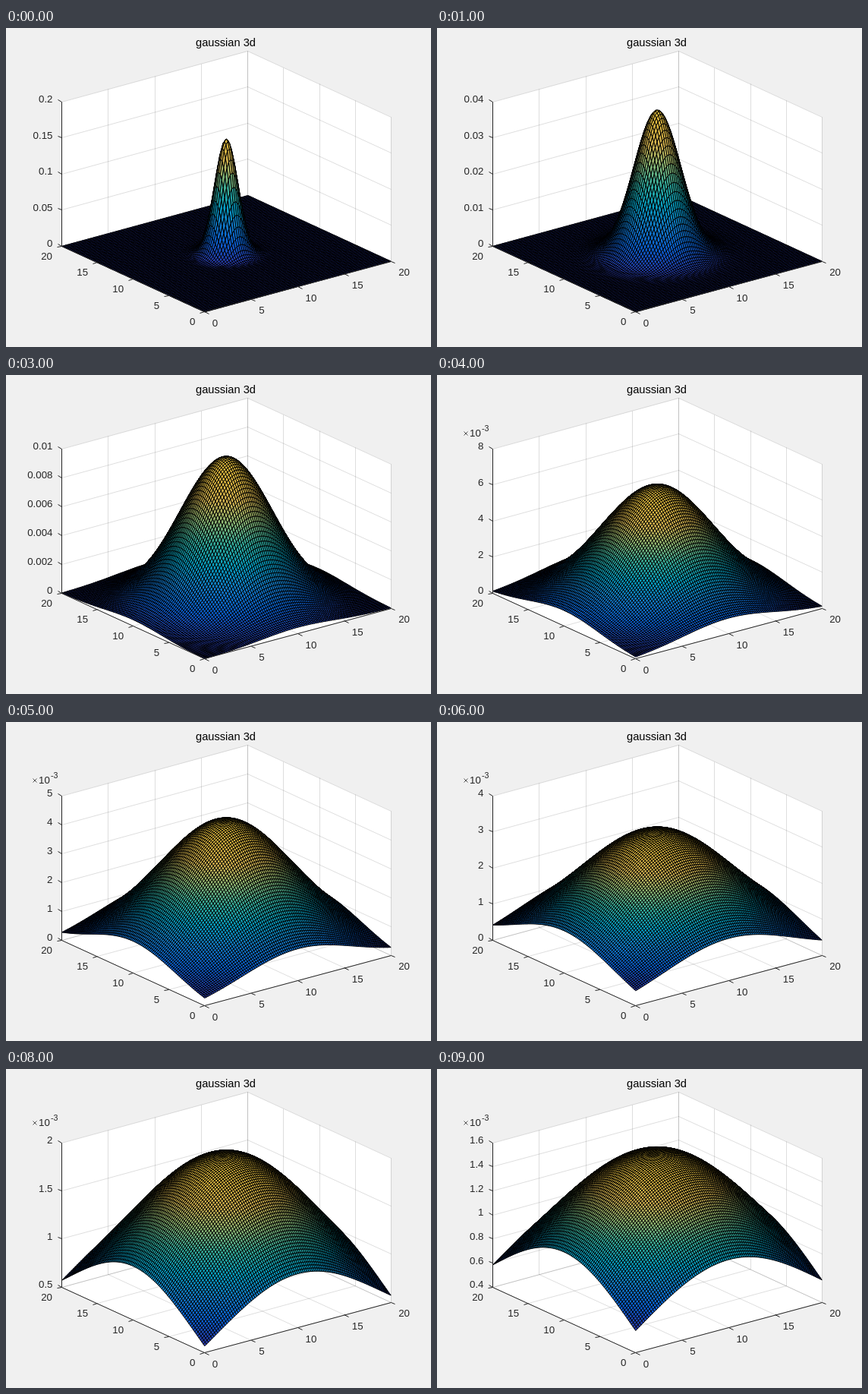
Recreate the animation shown at these times as an HTML page with a canvas. Size 560 by 420 pixels, loop 10000 ms.

```html
<!DOCTYPE html>
<html lang="en">
<head>
<meta charset="utf-8">
<title>gaussian 3d</title>
<style>
  html, body { margin: 0; width: 100%; height: 100%; overflow: hidden; background: #f0f0f0; }
  canvas { display: block; width: 560px; height: 420px; }
</style>
</head>
<body>
<canvas id="stage" width="560" height="420"></canvas>
<script>
const ctx = document.getElementById('stage').getContext('2d');
const INK = '#262626';
const FONT = '"Liberation Sans", Arial, sans-serif';
const SIZE = 20, CELLS = 100, HEIGHT = 190;

// Vertical axis for sigma = 1..10: low, high, step, unit
const AXES = [
  [0, 0.2, 0.05, 1],
  [0, 0.04, 0.01, 1],
  [0, 0.02, 0.005, 1],
  [0, 0.01, 0.002, 1],
  [0, 8, 2, 1e-3],
  [0, 5, 1, 1e-3],
  [0, 4, 1, 1e-3],
  [0.5, 2.5, 0.5, 1e-3],
  [0.5, 2, 0.5, 1e-3],
  [0.4, 1.6, 0.2, 1e-3]
];

// Surface colours from the lowest to the highest point
const RAMP = [
  [42, 56, 170], [10, 98, 215], [18, 128, 208], [6, 162, 196], [52, 178, 160],
  [142, 186, 118], [215, 182, 82], [224, 186, 66], [226, 190, 60]
];

function rampColor(t) {
  const p = Math.max(0, Math.min(1, t)) * (RAMP.length - 1);
  const i = Math.min(RAMP.length - 2, Math.floor(p));
  const mix = RAMP[i].map((c, n) => Math.round(c + (RAMP[i + 1][n] - c) * (p - i)));
  return `rgb(${mix})`;
}

// h is the fraction of the vertical axis
function project(x, y, h = 0) {
  const u = x / SIZE, v = y / SIZE;
  return [261.8 + 245.4 * u - 188.3 * v, 373.9 - 66.8 * u - 86.6 * v - HEIGHT * h];
}

function trace(points) {
  ctx.beginPath();
  points.forEach(([x, y], i) => i ? ctx.lineTo(x, y) : ctx.moveTo(x, y));
}

// One-pixel line with its ends on pixel centres
function line(color, ...points) {
  trace(points.map(p => p.map(c => Math.floor(c) + 0.5)));
  ctx.strokeStyle = color;
  ctx.lineWidth = 1;
  ctx.stroke();
}

function text(str, x, y, align, size = 13.33, color = INK) {
  ctx.font = `${size}px ${FONT}`;
  ctx.textAlign = align;
  ctx.textBaseline = 'alphabetic';
  ctx.fillStyle = color;
  ctx.fillText(str, x, y);
}

function heights([low, high, step]) {
  const count = Math.round((high - low) / step);
  return Array.from({ length: count + 1 }, (_, i) => ({
    h: i / count,
    label: String(+(low + i * step).toFixed(4))
  }));
}

function drawBox(ticks) {
  const grid = 'rgba(38,38,38,0.15)';
  ctx.fillStyle = '#fff';
  trace([project(0, 0), project(0, 20), project(0, 20, 1), project(20, 20, 1),
         project(20, 0, 1), project(20, 0)]);
  ctx.fill();
  for (let v = 0; v <= SIZE; v += 5) {
    line(grid, project(v, 0), project(v, 20), project(v, 20, 1));
    line(grid, project(0, v), project(20, v), project(20, v, 1));
  }
  for (const { h } of ticks) {
    line(grid, project(0, 20, h), project(20, 20, h), project(20, 0, h));
  }
}

function drawSurface(sigma, [low, high, , unit]) {
  const peak = 1 / (2 * Math.PI * sigma * sigma);
  const gauss = (x, y) =>
    peak * Math.exp(-((x - 10) ** 2 + (y - 10) ** 2) / (2 * sigma * sigma));
  const floor = gauss(0, 0);
  const step = SIZE / CELLS;
  const nodes = [];
  for (let i = 0; i <= CELLS; i++) {
    nodes.push([]);
    for (let j = 0; j <= CELLS; j++) {
      const x = i * step, y = j * step, z = gauss(x, y);
      nodes[i].push({ at: project(x, y, (z / unit - low) / (high - low)), z });
    }
  }
  ctx.strokeStyle = '#000';
  ctx.lineWidth = 1;
  ctx.lineJoin = 'round';
  // Far corner first, so nearer cells cover those behind
  for (let i = CELLS - 1; i >= 0; i--) {
    for (let j = CELLS - 1; j >= 0; j--) {
      const a = nodes[i][j];
      trace([a.at, nodes[i + 1][j].at, nodes[i + 1][j + 1].at, nodes[i][j + 1].at]);
      ctx.closePath();
      ctx.fillStyle = rampColor((a.z - floor) / (peak - floor));
      ctx.fill();
      ctx.stroke();
    }
  }
}

function drawAxes(ticks, unit) {
  line(INK, project(0, 20, 1), project(0, 20), project(0, 0), project(20, 0));
  const tick = ([x, y], dx, dy) => line(INK, [x, y], [x + dx, y + dy]);
  for (let v = 0; v <= SIZE; v += 5) {
    const onX = project(v, 0), onY = project(0, v);
    tick(onX, 5.5, 2.5);
    text(v, onX[0] + 10, onX[1] + 19, 'left');
    tick(onY, -6, 1.7);
    text(v, onY[0] - 12.5, onY[1] + 17.5, 'right');
  }
  for (const { h, label } of ticks) {
    const onZ = project(0, 20, h);
    tick(onZ, -5.5, -2.5);
    text(label, 61.5, onZ[1] + 1, 'right');
  }
  if (unit !== 1) {
    const y = ticks.some(t => t.label.includes('.')) ? 74.5 : 80.5;
    line('#555', [35, y - 6], [40, y - 1]);
    line('#555', [40, y - 6], [35, y - 1]);
    text('10', 43, y, 'left');
    text('-3', 59, y - 6.5, 'left', 10.67);
  }
  text('gaussian 3d', 289.5, 24, 'center', 14.67, '#000');
}

function draw(index) {
  const axis = AXES[index], ticks = heights(axis);
  ctx.fillStyle = '#f0f0f0';
  ctx.fillRect(0, 0, 560, 420);
  drawBox(ticks);
  drawSurface(index + 1, axis);
  drawAxes(ticks, axis[3]);
}

let shown = -1;
function tickFrame() {
  const index = Math.floor(performance.now() / 1000) % AXES.length;
  if (index !== shown) draw(shown = index);
  requestAnimationFrame(tickFrame);
}
tickFrame();
</script>
</body>
</html>
```
